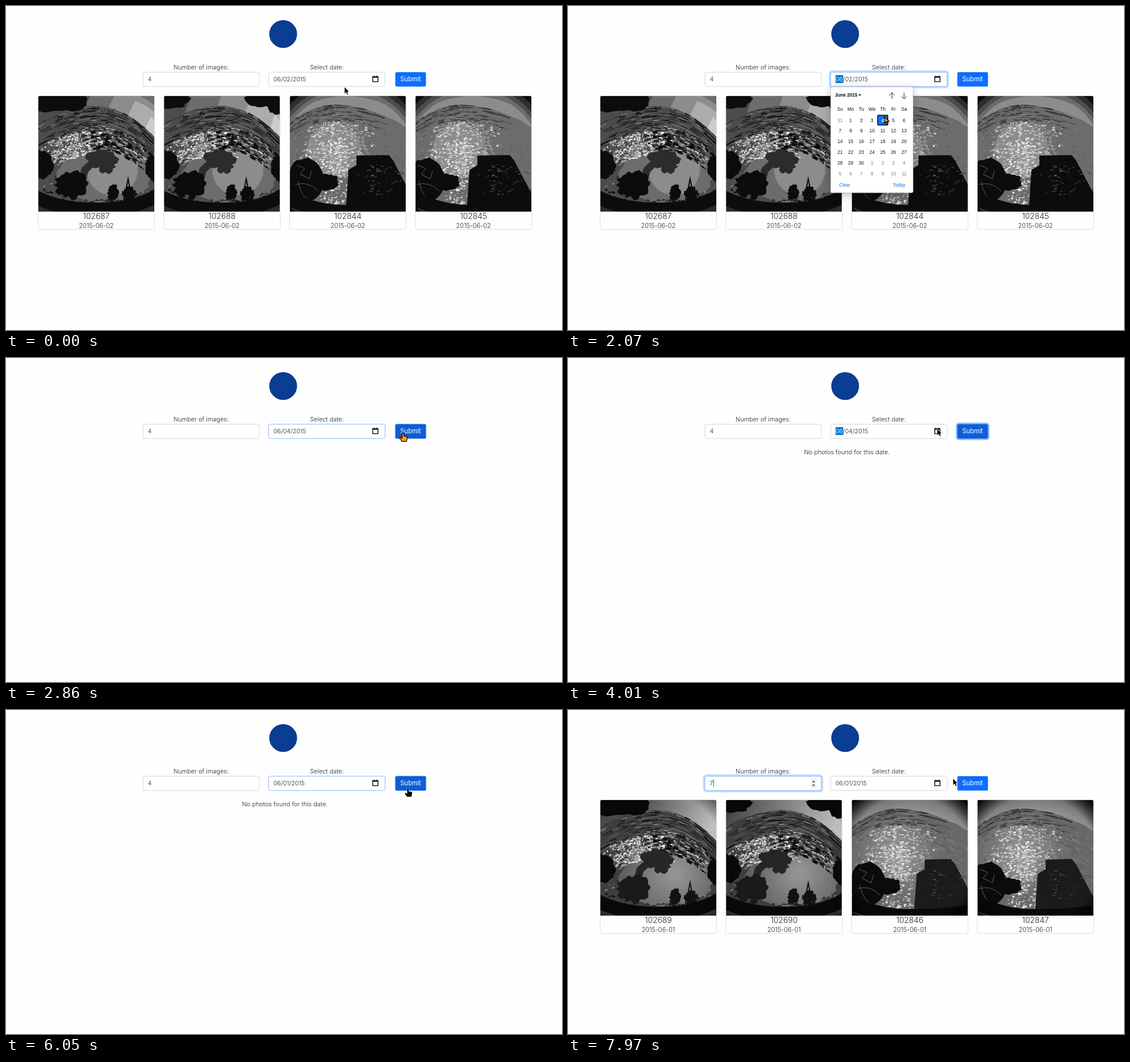
Recreate the animation shown at these times as an HTML page with a canvas. Size 979x572 px, loop 8 s.

```html
<!DOCTYPE html>
<html lang="en">
<head>
<meta charset="utf-8">
<title>Rover photos</title>
<style>
html, body { margin: 0; width: 100%; height: 100%; overflow: hidden; background: #fefefe; }
canvas { position: absolute; top: 159px; width: 204px; height: 204px; border-radius: 2px 2px 0 0; }
svg { position: absolute; left: 0; top: 0; }
text { font: 300 10.9px Inter, "Open Sans", sans-serif; fill: #212529; }
.mid { text-anchor: middle; }
.cal text { font: 8.2px "Liberation Sans", Arial, sans-serif; fill: #101010; }
.cal .b { font-weight: bold; }
.cal .link { fill: #1572cf; }
.cal .dim { fill: #7a7a7a; }
.cal { filter: drop-shadow(0 4px 8px rgba(0,0,0,.24)); }
</style>
</head>
<body>
<script>
const LOOP = 8000;
const SIZE = 204;
const cardX = k => 57 + 221.4 * k;
const SETS = [
  { ids: [102687, 102688, 102844, 102845], date: '2015-06-02' },
  { ids: [102689, 102690, 102846, 102847], date: '2015-06-01' }
];
const clamp = v => Math.max(0, Math.min(1, v));

// ---------- photos ----------
const grey = (v, a = 1) => `rgba(${v | 0},${v | 0},${v | 0},${a})`;

function rng(seed) {
  return () => {
    seed = (seed * 1664525 + 1013904223) >>> 0;
    return seed / 4294967296;
  };
}

function painter(g, seed) {
  const rand = rng(seed);
  const between = (a, b) => a + (b - a) * rand();
  const radial = (cx, cy, r0, r1, from, to) => {
    const f = g.createRadialGradient(cx, cy, r0, cx, cy, r1);
    f.addColorStop(0, from);
    f.addColorStop(1, to);
    return f;
  };
  const fill = style => { g.fillStyle = style; g.fillRect(0, 0, SIZE, SIZE); };

  function land(ridge, tone) {
    g.beginPath();
    g.moveTo(0, SIZE);
    for (let x = 0; x <= SIZE; x += 3) g.lineTo(x, ridge(x) + between(-1, 1));
    g.lineTo(SIZE, SIZE);
    g.fillStyle = grey(tone);
    g.fill();
  }
  // flecks that follow the curve of the ridge, lo..hi below it
  function flecks(ridge, n, [x0, x1], [lo, hi], [dark, light], len, thick) {
    for (let i = 0; i < n; i++) {
      const x = x0 + (x1 - x0) * (rand() + rand()) / 2;
      const y = ridge(x) + between(lo, hi);
      const w = len * between(.3, 1.3) / 2;
      const slope = (ridge(x + 2) - ridge(x - 2)) / 4;
      g.strokeStyle = grey(between(dark, light));
      g.lineWidth = thick * between(.4, 1.4);
      g.beginPath();
      g.moveTo(x - w, y - slope * w);
      g.lineTo(x + w, y + slope * w);
      g.stroke();
    }
  }
  // rough-edged ellipse
  function lump(style, cx, cy, rx, ry, rough = .1) {
    g.beginPath();
    for (let a = 0; a < Math.PI * 2; a += .22) {
      const r = 1 + between(-rough, rough);
      g.lineTo(cx + rx * r * Math.cos(a), cy + ry * r * Math.sin(a));
    }
    g.fillStyle = style;
    g.fill();
  }
  function limb(tone, width, d) {
    g.strokeStyle = grey(tone);
    g.lineWidth = width;
    g.stroke(new Path2D(d));
  }
  return { radial, fill, land, flecks, lump, limb };
}

function frontView(g, right, late) {
  const { radial, fill, land, flecks, lump, limb } = painter(g, 7);
  const ridge = x => 18 + (x - 100) ** 2 * (x < 100 ? .0029 : .005);
  const sky = g.createLinearGradient(right ? 20 : 70, 0, 190, 60);
  sky.addColorStop(0, grey(75));
  sky.addColorStop(1, grey(190));
  fill(sky);
  land(ridge, 62);
  flecks(ridge, 380, [-30, 234], [0, 46], [8, 130], 18, 1.4);
  flecks(ridge, 500, [-20, 224], [40, 120], [20, 150], 5, 2.6);
  lump(radial(130, 130, 10, 95, grey(late ? 146 : 140), grey(late ? 92 : 100)), 114, 142, 84, 46, .04);
  flecks(ridge, 520, [-5, 140], [44, 88], [120, 255], 4, 2.4);
  flecks(ridge, 130, [70, 220], [32, 76], [0, 60], 9, 3.6);
  flecks(ridge, 130, [80, 220], [34, 78], [110, 210], 6, 1.4);

  // the rover's shadow
  const tone = late ? 38 : 45;
  g.save();
  g.translate(right ? -13 : 0, 0);
  g.save();
  if (late) g.translate(-12, -7);
  lump(grey(tone), 112, 111, 27, 17, .16);
  lump(grey(tone), 120, 124, 14, 12, .2);
  limb(tone, 13, 'M102 112L82 130 74 160');
  g.restore();
  lump(grey(26), 58, 156, 29, 24, .18);
  lump(grey(18), 132, 171, 10, 14, .18);
  lump(grey(18), 160, 174, 12, 13, .18);
  limb(18, 2, 'M152 176L158 146 164 176');
  g.restore();

  flecks(x => 182 - (x - 102) ** 2 * .002, 90, [0, 204], [0, 16], [8, 70], 5, 3);
  limb(9, 24, 'M-10 176Q40 202 102 200Q170 202 214 172');
  lump(grey(9), 3, 121, 23, 25);
  lump(grey(9), 202, 127, 14, 21);
  fill(radial(102, 105, 118, 150, grey(0, 0), grey(0, .6)));
  if (right) {
    lump(grey(8), 14, 4, 32, 18);
    lump(grey(8), 172, 5, 30, 14);
    lump(grey(8), 198, 14, 18, 18);
  } else {
    lump(grey(8), 20, 6, 44, 22);
    lump(grey(8), 62, 8, 24, 19, .05);
  }
}

function rearView(g, right, late) {
  const { radial, fill, land, flecks, lump, limb } = painter(g, 31);
  const ridge = x => 16 + (x - 78) ** 2 * (x < 78 ? .005 : .0024);
  fill(radial(100, 165, 140, 195, grey(155), grey(85)));
  land(ridge, 104);
  flecks(ridge, 200, [-30, 170], [0, 28], [25, 125], 18, 1.4);
  flecks(ridge, 600, [-10, 214], [18, 130], [70, 140], 4, 1.6);
  flecks(ridge, 200, [80, 224], [30, 100], [90, 125], 10, 2);
  fill(radial(78, 96, 5, 80, grey(255, .3), grey(255, 0)));
  flecks(ridge, 650, [5, 150], [30, 125], [130, 250], 4, 2);
  flecks(ridge, 260, [50, 118], [65, 185], [150, 255], 4, 2.3);

  g.save();
  g.translate(right ? -8 : 0, 0);
  const edge = late ? 128 : 117;
  g.fillStyle = grey(27);
  g.fill(new Path2D(`M${edge - 14} 130L${edge} 122V105L174 104 182 114 214 175V204H${edge - 19}Z`));
  flecks(x => 0, 60, [115, 200], [120, 175], [40, 105], 4, 1);
  lump(grey(11), 28, 148, 32, 38, .06);
  lump(grey(11), 66, 152, 20, 14, .12);
  limb(95, 1, 'M12 122L26 128 18 138 34 146 38 132M10 156Q34 150 50 168M14 150Q20 180 36 184');
  g.restore();

  limb(9, 24, 'M-10 178Q50 206 102 204Q150 206 214 196');
  fill(radial(102, 105, 112, 143, grey(0, 0), grey(0, .95)));
}

// the first set is shown in a few flat tones
function posterize(g, step) {
  const img = g.getImageData(0, 0, SIZE, SIZE);
  img.data.forEach((v, i) => {
    if (i % 4 < 3) img.data[i] = 12 + Math.round((v - 12) / step) * step;
  });
  g.putImageData(img, 0, 0);
}

const photos = SETS.map((_, late) => SETS[late].ids.map((_, k) => {
  const c = document.createElement('canvas');
  c.width = c.height = SIZE;
  c.style.left = cardX(k) + 'px';
  const g = c.getContext('2d');
  (k < 2 ? frontView : rearView)(g, k % 2, late);
  if (!late) posterize(g, 32);
  document.body.append(c);
  return c;
}));

// ---------- page ----------
function set(e, attrs) {
  for (const k in attrs) e.setAttribute(k, attrs[k]);
}
function el(parent, tag, attrs = {}, content) {
  const e = document.createElementNS('http://www.w3.org/2000/svg', tag);
  set(e, attrs);
  if (content !== undefined) e.textContent = content;
  parent.append(e);
  return e;
}
const show = (e, on) => { e.style.display = on ? '' : 'none'; };
const rect = (p, x, y, width, height, fill, more) => el(p, 'rect', { x, y, width, height, fill, ...more });
const label = (p, x, y, s, cls = 'mid', style = '') => el(p, 'text', { x, y, class: cls, style }, s);
const path = (p, d, more) => el(p, 'path', { d, ...more });

const svg = el(document.body, 'svg', { width: 979, height: 572, viewBox: '0 0 979 572' });
el(svg, 'circle', { cx: 488, cy: 49.5, r: 24.5, fill: '#0b3d91' });
label(svg, 343.5, 112, 'Number of images:');
label(svg, 565, 112, 'Select date:');

// a bordered input; the returned function sets its focus from 0 to 1
function field(x) {
  const ring = rect(svg, x, 117, 205, 25, 'none', { rx: 2.7, stroke: '#0d6efd' });
  const box = rect(svg, x, 117, 205, 25, '#fff', { rx: 2.7 });
  return level => {
    const m = clamp(level * 2);
    const mix = (a, b) => Math.round(a + (b - a) * m);
    set(ring, { 'stroke-width': 1 + 5.4 * level, 'stroke-opacity': .25 * level });
    set(box, { stroke: `rgb(${mix(206, 134)},${mix(212, 183)},${mix(218, 254)})` });
  };
}
const focusNum = field(241);
const focusDate = field(462.5);

const num = label(svg, 249.5, 133, '4', '');
const caret = rect(svg, 256, 122.5, .8, 13, '#212529');
const spin = el(svg, 'g');
rect(spin, 427.5, 121, 10, 16.5, '#efefef');
const spinHot = rect(spin, 427.5, 121, 10, 8.5, '#c6c6c6');
path(spin, 'M429.8 127.5H435L432.4 124.4ZM429.8 131.7H435L432.4 134.8Z', { fill: '#404040' });

const mark = rect(svg, 471, 122, 13.6, 14, '#0078d7');
const date = label(svg, 471, 133, '', '', 'font-size:10.7px');
const month = el(date, 'tspan', {}, '06');
const rest = el(date, 'tspan');
path(svg, 'M645.8 125H655V133.6H645.8ZM645.8 125.8H655M647.8 123V125M653 123V125', { fill: 'none', stroke: '#000', 'stroke-width': 1.4 });

const btnRing = rect(svg, 685.5, 116.7, 54, 25.6, 'none', { rx: 2.7, stroke: '#3184fd' });
const btn = rect(svg, 685.5, 116.7, 54, 25.6, '#0d6efd', { rx: 2.7 });
label(svg, 712.5, 133, 'Submit', 'mid', 'fill:#fff;font-size:11.1px;font-weight:400');
const msg = label(svg, 491, 170, 'No photos found for this date.');

const cards = SETS.map(s => {
  const g = el(svg, 'g');
  s.ids.forEach((id, k) => {
    const x = cardX(k);
    rect(g, x - .4, 158.5, 205, 236, 'none', { rx: 2.7, stroke: '#000', 'stroke-opacity': .13 });
    label(g, x + 102, 375.5, id, 'mid', 'font-size:13.8px');
    label(g, x + 102, 391.8, s.date, 'mid', 'font-size:11px');
  });
  return g;
});

// ---------- calendar ----------
const CELL = 18.8;
const colX = c => 479 + CELL * c;
const cal = el(svg, 'g', { class: 'cal' });
rect(cal, 462.5, 142.8, 145.2, 187, '#fff', { rx: 3, stroke: '#b5b5b5', 'stroke-width': .7 });
label(cal, 470, 160.3, 'June 2015', 'b');
path(cal, 'M511.5 156H516.3L513.9 158.8Z', { fill: '#101010' });
path(cal, 'M570.3 164V153M565.6 157.7L570.3 153 575 157.7M591.8 153V164M587.1 159.3L591.8 164 596.5 159.3', { fill: 'none', stroke: '#222' });
['Su', 'Mo', 'Tu', 'We', 'Th', 'Fr', 'Sa'].forEach((d, c) => label(cal, colX(c), 185, d));
const hover = rect(cal, 0, 192.2, CELL, CELL, '#e4e4e4', { rx: 1.5 });
const pick = rect(cal, 0, 192.7, 17.8, 17.6, '#0a72f0', { rx: 1, stroke: '#101010', 'stroke-width': 1.5 });
const days = Array.from({ length: 42 }, (_, i) => {
  const inMonth = i > 0 && i <= 30;
  const n = inMonth ? i : (i + 30) % 30 || 31;
  return label(cal, colX(i % 7), 204.5 + CELL * Math.floor(i / 7), i ? n : 31, inMonth ? 'mid' : 'mid dim');
});
label(cal, 487, 319, 'Clear', 'mid link');
label(cal, 583, 319, 'Today', 'mid link');

// ---------- pointer ----------
const pointer = el(svg, 'g');
const arrow = path(pointer, 'M0 0V11.8L2.7 9.3 4.7 13.6 6.7 12.7 4.8 8.6H8.4Z');
const hand = path(pointer, 'M-1.6 1.3a1.5 1.5 0 0 1 3 0V5.4L6.4 6.4Q8 7 7.5 9L6.2 15.4H-1.6L-5.6 10Q-5.8 7.6 -3.6 8.2L-1.6 9.6Z');

// resting points: time, x, y
const STOPS = [
  [0, 596, 143], [390, 650, 127], [870, 646, 131], [1680, 564, 190], [2070, 557, 195],
  [2860, 699, 132], [3130, 699, 132], [3520, 573, 126], [3760, 650, 125], [4130, 650, 125],
  [4670, 534, 197], [5210, 501, 200], [5510, 650, 134], [5900, 706, 138], [6170, 709, 138],
  [6530, 440, 117], [6950, 430, 125], [7580, 431, 125], [7970, 678, 121]
];
function pointerAt(t) {
  const i = STOPS.findIndex(s => s[0] > t);
  if (i < 0) return STOPS[STOPS.length - 1].slice(1);
  const [t0, x0, y0] = STOPS[i - 1], [t1, x1, y1] = STOPS[i];
  const u = (t - t0) / (t1 - t0);
  const e = u * u * (3 - 2 * u);
  return [x0 + (x1 - x0) * e, y0 + (y1 - y0) * e];
}

// ---------- timeline ----------
const OPEN = [510, 4010];    // calendar icon clicked
const PICKED = [2190, 5360]; // day chosen
const SEND = [2860, 6050];   // submit clicked
const EMPTY = 3010, FOUND = 6290, COUNT = 7190;
const CLICKS = [OPEN[0], 2070, SEND[0], 5210, 5920];
const FADE = 200;

function draw(t) {
  const [x, y] = pointerAt(t);
  const on = (a, b = LOOP) => t >= a && t < b;
  const fade = (a, b = 2 * LOOP) => clamp((t - a) / FADE) * clamp(1 - (t - b) / FADE);
  const over = (l, r, top = 117, bottom = 142.5) => x >= l && x <= r && y >= top && y <= bottom;
  const both = f => f(0) || f(1);

  rest.textContent = `/${t < PICKED[0] ? '02' : t < PICKED[1] ? '04' : '01'}/2015`;
  const marked = both(i => on(OPEN[i], SEND[i]));
  month.style.fill = marked ? '#fff' : '';
  show(mark, marked);
  focusDate(both(i => fade(OPEN[i], SEND[i] - 130)));

  const sent = fade(SEND[0] - 80, OPEN[1]) || fade(SEND[1] - 80, COUNT);
  const overBtn = over(685, 740);
  set(btnRing, { 'stroke-width': 5.4 * sent, 'stroke-opacity': .5 * sent });
  set(btn, { fill: overBtn || sent ? '#0b5ed7' : '#0d6efd' });

  focusNum(fade(COUNT));
  num.textContent = 4 + Math.max(0, Math.min(3, 1 + Math.floor((t - COUNT) / 160)));
  show(caret, on(COUNT));
  show(spin, on(COUNT) || over(241, 446));
  show(spinHot, over(427, 438, 121, 129.5));

  show(msg, on(EMPTY, FOUND));
  const shown = [on(0, SEND[0]), on(FOUND)];
  cards.forEach((g, i) => {
    show(g, shown[i]);
    photos[i].forEach((c, k) => {
      const delay = [0, 55, 320, 120][k];
      const loaded = i ? clamp((t - 6750 - delay) / 530) ** 3 : 1;
      show(c, shown[i]);
      c.style.clipPath = `inset(0 0 ${SIZE * (1 - loaded)}px 0)`;
    });
  });

  show(cal, both(i => on(OPEN[i] + 120, PICKED[i])));
  const day = Math.round((x - 479) / CELL);
  const chosen = t < CLICKS[1] ? 2 : 4;
  show(hover, Math.round((y - 201.5) / CELL) === 0 && day >= 0 && day < 7);
  set(hover, { x: colX(day) - CELL / 2 });
  set(pick, { x: colX(chosen) - 8.9 });
  days.forEach((d, i) => {
    d.style.fill = i === chosen ? '#fff' : '';
    d.style.fontWeight = i === chosen ? 'bold' : '';
  });

  const pressed = CLICKS.some(c => on(c, c + 120));
  set(pointer, {
    transform: `translate(${x} ${y})`,
    fill: pressed ? '#f59a23' : '#000',
    stroke: pressed ? '#000' : '#fff',
    'stroke-width': pressed ? 1.2 : .5
  });
  show(arrow, !overBtn);
  show(hand, overBtn);
}

function loop() {
  draw(performance.now() % LOOP);
  requestAnimationFrame(loop);
}
loop();
</script>
</body>
</html>
```
